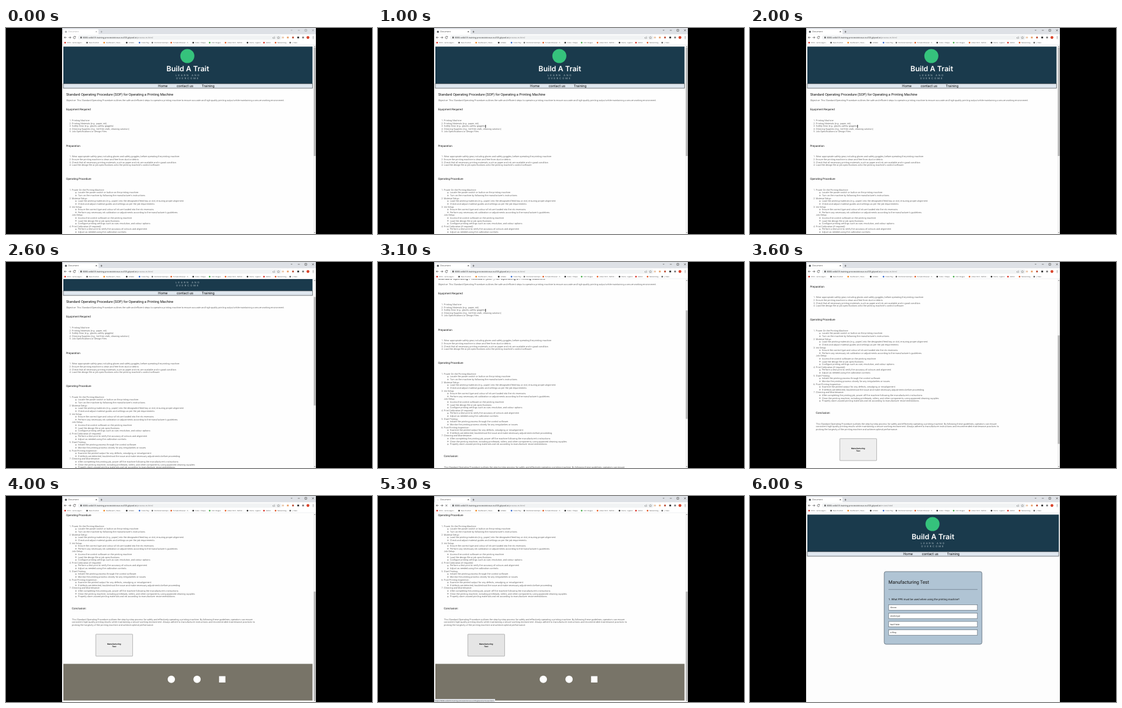
Animation, 600 px wide and 338 px high, one loop 8200 ms. Source, as an HTML page:

```html
<!DOCTYPE html>
<html lang="en">
<head>
<meta charset="utf-8">
<title>Document</title>
<style>
html, body { margin: 0; width: 100%; height: 100%; overflow: hidden; background: #000; }
svg { display: block; width: 600px; height: 338px; }
text { font-family: Roboto, sans-serif; text-rendering: geometricPrecision; white-space: pre; }
.light { font-weight: 300; }
.ui { font-family: "Open Sans", "Noto Sans", sans-serif; }
.arial { font-family: "Liberation Sans", Arial, sans-serif; }
.brand { font-family: Inter, sans-serif; font-weight: 600; }
.tag { font-family: Inter, sans-serif; letter-spacing: 2px; }
.bold { font-weight: 700; }
.line { fill: none; stroke: #555; stroke-width: .7; }
</style>
</head>
<body>
<svg id="stage" viewBox="0 0 600 338"></svg>
<script>
const LOOP = 8200;
const BODY = 3.88, HEAD = 4.5, PITCH = 4.62;
const INK = '#2c2c2c';
const HOST = '8080-velk418-training-processtotocux-eu106.gitpod.io';

// Text is placed by the middle of its capitals.
const text = (x, y, size, str, cls = '', fill = '#111', anchor = 'start') =>
  `<text x="${x}" y="${(y + size * .355).toFixed(2)}" font-size="${size}" class="${cls}" fill="${fill}" text-anchor="${anchor}">${str}</text>`;
const rect = (x, y, w, h, fill, extra = '') =>
  `<rect x="${x}" y="${y}" width="${w}" height="${h}" fill="${fill}" ${extra}/>`;
const dot = (x, y, r, fill, extra = '') =>
  `<circle cx="${x}" cy="${y}" r="${r}" fill="${fill}" ${extra}/>`;
const path = (d, extra = '') => `<path class="line" d="${d}" ${extra}/>`;
const para = (x, y, str) => text(x, y, BODY, str, 'light', INK);

// Lines: "#" numbered, "-" bulleted, anything else plain.
function list(top, lines) {
  let n = 0;
  return lines.map((line, i) => {
    const y = top + i * PITCH, body = line.slice(1);
    if (line[0] === '#')
      return text(107, y, BODY, ++n + '.', 'light', INK, 'end') + para(108.1, y, body);
    if (line[0] === '-')
      return dot(114.6, y + .2, .7, 'none', 'stroke="#333" stroke-width=".45"') + para(118, y, body);
    return para(108.1, y, line);
  }).join('');
}

function siteHeader(right) {
  const dx = (right - 502.5) / 2;
  return rect(94, 30.5, right - 94, 60.8, '#1a3a4c') +
    rect(94, 91.6, right - 94.2, 7.3, '#dfe7ef', 'stroke="#2a2f33" stroke-width=".6"') +
    `<g transform="translate(${dx} 0)">` +
    dot(297.3, 46, 11.5, '#35c27c') +
    text(298, 66.6, 12, 'Build A Trait', 'brand', '#fff', 'middle') +
    text(278, 77.6, 4, 'LEARN AND', 'tag', '#b4c3cb') +
    text(278.7, 82.4, 4, 'OVERCOME', 'tag', '#b4c3cb') +
    text(249.3, 95.3, 5.8, 'Home') +
    text(279.8, 95.3, 5.8, 'contact us') +
    text(321, 95.3, 5.8, 'Training') + '</g>';
}

function procedurePage() {
  return siteHeader(502.5) +
    text(98.7, 108.8, 5.7, 'Standard Operating Procedure (SOP) for Operating a Printing Machine') +
    para(98.7, 119.1, 'Objective: This Standard Operating Procedure outlines the safe and efficient steps to operate a printing machine to ensure accurate and high-quality printing output while maintaining a secure working environment.') +
    text(98.5, 133.6, HEAD, 'Equipment Required') +
    list(151.6, [
      '#Printing Machine',
      '#Printing Materials (e.g., paper, ink)',
      '#Safety Gear (e.g., gloves, safety goggles)',
      '#Cleaning Supplies (e.g., lint-free cloth, cleaning solution)',
      '#Job Specifications or Design Files']) +
    rect(176, 159, .7, 4.8, '#000', 'id="caret"') +
    text(98.5, 192.9, HEAD, 'Preparation') +
    list(211, [
      '#Wear appropriate safety gear, including gloves and safety goggles, before operating the printing machine.',
      '#Ensure the printing machine is clean and free from dust or debris.',
      '#Check that all necessary printing materials, such as paper and ink, are available and in good condition.',
      "#Load the design file or job specifications onto the printing machine's control software."]) +
    text(98.5, 247.8, HEAD, 'Operating Procedure') +
    list(265.4, [
      '#Power On the Printing Machine:',
      '-Locate the power switch or button on the printing machine.',
      "-Turn on the machine by following the manufacturer's instructions.",
      '#Material Setup:',
      '-Load the printing materials (e.g., paper) into the designated feed tray or slot, ensuring proper alignment.',
      '-Check and adjust material guides and settings as per the job requirements.',
      '#Ink Setup:',
      '-Ensure the correct type and colour of ink are loaded into the ink reservoirs.',
      "-Perform any necessary ink calibration or adjustments according to the manufacturer's guidelines.",
      'Job Setup:',
      '-Access the control software on the printing machine.',
      '-Load the design file or job specifications.',
      '-Configure printing settings such as size, resolution, and colour options.',
      '#Print Calibration (if required):',
      '-Perform a test print to verify the accuracy of colours and alignment.',
      '-Adjust as needed using the calibration controls.',
      '#Start Printing:',
      '-Initiate the printing process through the control software.',
      '-Monitor the printing process closely for any irregularities or issues.',
      '#Post-Printing Inspection:',
      '-Examine the printed output for any defects, smudging, or misalignment.',
      '-If defects are detected, troubleshoot the issue and make necessary adjustments before proceeding.',
      '#Cleaning and Maintenance:',
      "-After completing the printing job, power off the machine following the manufacturer's instructions.",
      '-Clean the printing machine, including printheads, rollers, and other components, using approved cleaning supplies.',
      '-Properly store unused printing materials and ink according to manufacturer recommendations.']) +
    text(108.1, 400.1, HEAD, 'Conclusion:') +
    list(418.4, [
      'This Standard Operating Procedure outlines the step-by-step process for safely and effectively operating a printing machine. By following these guidelines, operators can ensure',
      'consistent high-quality printing results while maintaining a secure working environment. Always adhere to manufacturer instructions and recommended maintenance practices to',
      'prolong the longevity of the printing machine and achieve optimal performance.']) +
    rect(147.2, 442.8, 60.4, 36, '#efefef', 'id="button" rx=".6" stroke="#767676" stroke-width=".5"') +
    text(177.3, 458.6, 3.28, 'Manufacturing', 'arial bold', '#000', 'middle') +
    text(177.3, 462.4, 3.28, 'Test', 'arial bold', '#000', 'middle') +
    rect(94, 491.4, 408.5, 60.2, '#787468') +
    dot(271, 516.8, 6, '#fff') + dot(313.2, 516.8, 6, '#fff') +
    rect(349.3, 511.6, 10.4, 10.4, '#fff');
}

function testPage() {
  const answers = ['Gloves', 'Alcohol gel', 'Nail Polish', 'A Ring'];
  return rect(92, 28, 416, 310, '#fdfdfd') + siteHeader(506.3) +
    rect(220, 124, 160.2, 119.2, '#b0c4d4', 'rx="3" stroke="#4c5a66" stroke-width=".7"') +
    text(227, 141.3, 7.7, 'Manufacturing Test') +
    rect(227, 152.9, 146, .6, '#5f6f7c') +
    text(227, 169.4, 4.33, '1. What PPE must be used when using the printing machine?') +
    answers.map((a, i) => {
      const y = 178.4 + i * 13.75;
      return rect(227.2, y, 145.6, 8.9, '#fff', 'stroke="#56626c" stroke-width=".6"') +
        text(230, y + 4.5, 3.28, a, 'arial');
    }).join('');
}

function browser() {
  const marks = [
    [96, 'Html - carine algori...', '#d93025'], [132, 'New chat bot', '#555'],
    [160, 'Dashboard | Class...', '#f08a24'], [197, 'AtHabs', '#333'],
    [218, 'Code Play...', '#3c6fd0'], [239, 'Kindre &amp; Desktop L...', '#777'],
    [270, 'Tomato Browser - X...', '#e0602a'], [306, 'Code + Shape', '#333'],
    [333, 'Unit Images', '#4caf50'], [359, 'video Html - Definit...', '#e8642c'],
    [395, 'Home - Vyplen', '#333'], [422, 'dotlist', '#d93025'],
    [441, 'Networking...', '#e05a2a'], [465, '| Class', '#666']];
  const icons = [[462, '#e8a06a'], [470.5, '#c0563f'], [479, '#2b2b2b'], [487, '#777']];
  const url = (id, page) => `<text id="${id}" class="ui" x="126" y="16.8" font-size="3.5" fill="#222">${HOST}<tspan fill="#777">/${page}</tspan></text>`;
  return rect(92, 0, 416, 10.5, '#dee1e6') +
    rect(92, 10.5, 416, 17.5, '#fff') +
    `<path d="M93.5 10.5V3.6q0-1.6 1.6-1.6H150q1.6 0 1.6 1.6V10.5z" fill="#fff"/>` +
    '<g id="titlebar">' +
    dot(98.2, 6.2, 1.6, '#4a4e53', 'id="favicon"') +
    text(102.3, 6.2, 3.4, 'Document', 'ui', '#333') +
    path('M147 5l2.2 2.2m0-2.2l-2.2 2.2M155 6.2h3m-1.5-1.5v3') +
    path('M467 3l1.2 1.2 1.2-1.2M478.5 3.8h3M490 2.3h3v3h-3zM501.8 2.3l3 3m0-3l-3 3') +
    '</g>' +
    path('M99.3 15.6h-3.8m1.7-1.7l-1.7 1.7 1.7 1.7M102.6 15.6h3.8m-1.7-1.7l1.7 1.7-1.7 1.7') +
    path('M113.7 14.5a1.9 1.9 0 1 0 .3 1.6M114 13.2v1.6h-1.6', 'id="reload"') +
    path('M110.7 14.1l3 3m0-3l-3 3', 'id="stop"') +
    rect(118, 12, 334, 7.3, '#f1f3f4', 'rx="3.6"') +
    rect(122, 15, 2.2, 2, '#555') + path('M122.5 15v-.6q.6-.9 1.2 0v.6') +
    url('url1', 'process-m.html') + url('url2', 'm-test.html') +
    path('M437.5 15v2h3v-2m-2 .6l2-2M446.6 13.8l.7 1.3 1.4.2-1 1 .2 1.4-1.3-.7-1.3.7.2-1.4-1-1 1.4-.2z', 'style="stroke-width:.4"') +
    dot(454, 15.6, 1.6, '#e9c3a4') +
    icons.map(([x, c]) => rect(x - 1.4, 14.2, 2.8, 2.8, c)).join('') +
    dot(495, 15.6, 2.4, '#d9452c') +
    [13.9, 15.6, 17.3].map(y => dot(503.5, y, .5, '#444')).join('') +
    marks.map(([x, s, c]) => dot(x + .9, 24.1, 1.4, c) + text(x + 4, 24.1, 2.7, s, 'ui', '#444')).join('') +
    rect(92, 27.6, 416, .4, '#dcdfe3');
}

const scrollbar = rect(504.2, 28, 3.8, 310, '#f1f1f1') +
  '<path d="M505 31l1.1-1.3 1.1 1.3zM505 335.3l1.1 1.3 1.1-1.3z" fill="#606060"/>' +
  rect(504.6, 32, 3, 178, '#b4b4b4', 'id="thumb"');

const stage = document.getElementById('stage');
stage.innerHTML =
  '<clipPath id="view"><rect x="92" y="28" width="416" height="310"/></clipPath>' +
  rect(0, 0, 600, 338, '#000') + rect(92, 0, 416, 338, '#fefefe') +
  `<g clip-path="url(#view)"><g id="page">${procedurePage()}</g>${scrollbar}</g>` +
  `<g id="test">${testPage()}</g>` + browser() +
  `<g id="status">${rect(92, 333, 100, 5, '#dee1e6')}${text(93, 335.6, 2.83, `https://${HOST}/m-test.html`, 'ui', '#555')}</g>`;

// Holds each value until the next [ms, value] pair.
function hold(id, prop, track) {
  const keys = track.map(([ms, v]) => ({ offset: ms / LOOP, [prop]: v, easing: 'step-end' }));
  keys.push({ offset: 1, [prop]: track[track.length - 1][1] });
  document.getElementById(id).animate(keys, { duration: LOOP, iterations: Infinity });
}

const scroll = [[0, 0],
  [2400, 5], [2500, 22], [2600, 44], [2700, 60], [2800, 66],
  [3000, 70], [3100, 82], [3200, 98], [3300, 115], [3400, 131], [3500, 146], [3600, 153],
  [3800, 174], [3900, 204], [4000, 216]];
const shift = k => scroll.map(([ms, y]) => [ms, `translate(0px, ${(y * k).toFixed(2)}px)`]);

hold('page', 'transform', shift(-1));
hold('thumb', 'transform', shift(.578));
hold('caret', 'opacity', [[0, 0], [900, 1], [1400, 0], [2000, 1], [2400, 0], [3000, 1], [3500, 0]]);
hold('titlebar', 'opacity', [[0, .5], [900, .8], [1000, 1]]);
hold('button', 'fill', [[0, '#efefef'], [4800, '#e5e5e5'], [5000, '#f5f5f5'], [5100, '#e5e5e5']]);
hold('status', 'opacity', [[0, 0], [5000, .3], [5100, .7], [5200, 1], [5700, .6], [5800, .3], [5900, .1], [6000, 0]]);
hold('favicon', 'opacity', [[0, 1], [5100, .1], [5700, 1]]);
hold('reload', 'opacity', [[0, 1], [5100, 0], [5700, 1]]);
hold('stop', 'opacity', [[0, 0], [5100, 1], [5700, 0]]);
hold('test', 'opacity', [[0, 0], [5600, 1]]);
hold('url1', 'opacity', [[0, 1], [5600, 0]]);
hold('url2', 'opacity', [[0, 0], [5600, 1]]);
</script>
</body>
</html>
```
